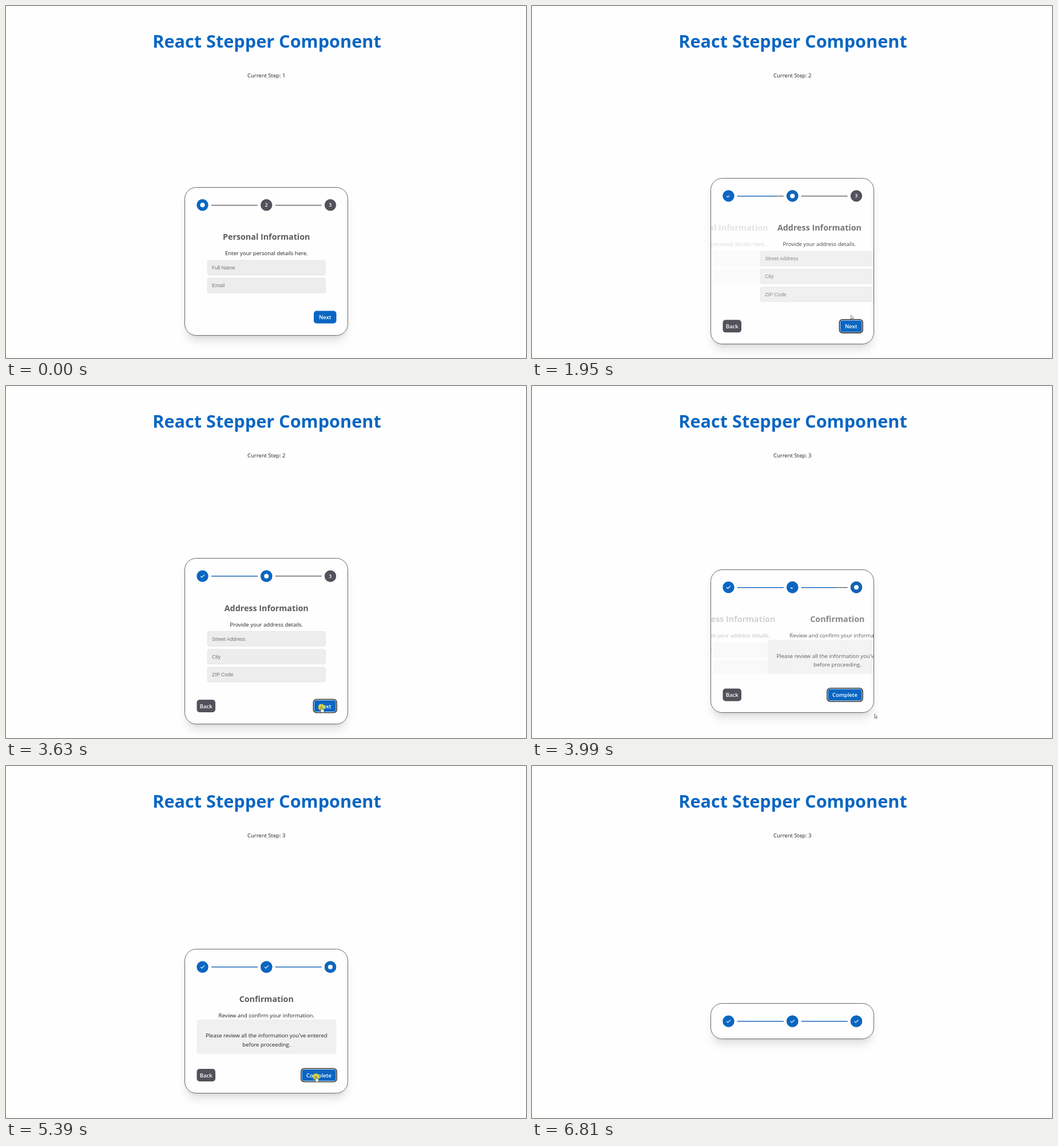
Recreate the animation shown at these times as an HTML page. Size 909x616 px, loop 7400 ms.

```html
<!DOCTYPE html>
<html lang="en">
<head>
<meta charset="utf-8">
<title>React Stepper Component</title>
<style>
html, body { margin: 0; width: 100%; height: 100%; overflow: hidden; background: #fefefe; }
svg { display: block; position: absolute; left: 0; top: 0; }
text { font: 9.52px "Open Sans", "Noto Sans", sans-serif; text-anchor: middle; fill: #222; }
.title { font-size: 30.65px; font-weight: 700; fill: #0a66c2; }
.head { font-size: 14.3px; font-weight: 700; fill: #5c5c5c; }
.hint { font: 8.9px "Liberation Sans", Arial, sans-serif; text-anchor: start; fill: #757575; }
.btn { font-size: 9.45px; font-weight: 600; fill: #fff; }
.num { font-size: 8.4px; font-weight: 600; fill: #fff; }
#card { position: absolute; left: 312px; width: 286px; box-sizing: border-box; border-radius: 20.5px;
  box-shadow: 0 13px 16px -3px rgba(0,0,0,.1), 0 5px 6px -4px rgba(0,0,0,.1); }
</style>
</head>
<body>
<div id="card"></div>
<svg id="stage" width="909" height="616" viewBox="0 0 909 616"></svg>
<script>
const LOOP = 7400, BLUE = '#0a66c2', GRAY = '#52525b';
const MID_X = 455.25, MID_Y = 446.75, HEADER = 61.5, FOOTER = 68, SLIDE_W = 285;
const starts = [1720, 3801, 5560];          // when each step transition begins
const shown = [1750, 3801, 5570];           // when it first becomes visible
const heights = [129, 160, 122, 0];         // content height per stage
const clicks = [[1570, 1690], [3630, 3780], [5390, 5540]];
const dots = [343.5, 455.25, 567];
const stage = document.getElementById('stage'), card = document.getElementById('card');

// time, x, y of the pointer
const pointer = [
  [260, 726, 301], [400, 690, 370], [600, 613, 490], [780, 559, 555], [920, 557, 562],
  [1010, 558, 560], [1400, 557.5, 541], [1950, 557.5, 541], [2250, 588, 547], [2550, 599, 544],
  [2630, 595, 545], [3020, 551.5, 560], [3160, 551.5, 561.5], [3850, 551.5, 561.5],
  [3990, 598.5, 574], [4200, 671, 562], [4370, 630, 541], [4440, 621, 540],
  [4840, 542, 543], [5620, 542, 543], [5850, 590, 560], [6080, 621.5, 564],
  [6170, 634, 567], [6500, 748, 584], [6810, 858, 603]
];

const clamp = v => Math.min(1, Math.max(0, v));

function ease(x) {                          // cubic-bezier(.25, .1, .35, 1)
  x = clamp(x);
  const curve = (s, a, b) => 3 * (1 - s) ** 2 * s * a + 3 * (1 - s) * s * s * b + s ** 3;
  let lo = 0, hi = 1;
  for (let i = 0; i < 20; i++) {
    const s = (lo + hi) / 2;
    if (curve(s, .25, .35) < x) lo = s; else hi = s;
  }
  return curve(lo, .1, 1);
}

function spring(ms) {
  const zeta = .75, w = 23.4, root = Math.sqrt(1 - zeta * zeta), t = Math.max(0, ms) / 1000;
  return 1 - Math.exp(-zeta * w * t) * (Math.cos(w * root * t) + zeta / root * Math.sin(w * root * t));
}

const text = (x, y, str, cls = '') => `<text x="${x}" y="${y}" class="${cls}">${str}</text>`;
const rect = (x, y, w, h, r, fill, extra = '') =>
  `<rect x="${x}" y="${y}" width="${w}" height="${h}" rx="${r}" fill="${fill}" ${extra}/>`;
const circle = (x, y, r, fill, alpha = 1) =>
  `<circle cx="${x}" cy="${y}" r="${r}" fill="${fill}" opacity="${alpha}"/>`;

const heading = (title, line) => text(MID_X, 30, title, 'head') + text(MID_X, 57, line);
const fields = names => names.map((name, i) => {
  const y = 66 + i * 31.3;
  return rect(352.2, y, 206.2, 25.8, 3, '#ededed', 'stroke="#e0e0e0" stroke-width=".7"')
    + text(360, y + 16, name, 'hint');
}).join('');

const slides = [
  heading('Personal Information', 'Enter your personal details here.') + fields(['Full Name', 'Email']),
  heading('Address Information', 'Provide your address details.') + fields(['Street Address', 'City', 'ZIP Code']),
  heading('Confirmation', 'Review and confirm your information.')
    + rect(333.5, 61, 244, 60.5, 2.5, '#f0f0f0')
    + text(MID_X, 92.5, "Please review all the information you've entered")
    + text(MID_X, 108, 'before proceeding.'),
  ''
];

const slide = (i, dx, alpha) => `<g transform="translate(${dx})" opacity="${alpha}">${slides[i]}</g>`;

function indicators(t, step, y) {
  const row = Math.floor(y);
  let out = '';
  for (let i = 0; i < 2; i++) {
    const x = dots[i] + 15.5, fill = step > i ? ease((t - starts[i]) / 400) : 0;
    out += rect(x, row, 81, 1.2, .5, GRAY) + rect(x, row, 81 * fill, 1.2, .5, BLUE);
  }
  dots.forEach((x, i) => {
    const tint = i === 0 ? 1 : step >= i ? ease((t - starts[i - 1]) / 300) : 0;
    out += tint < 1 ? circle(x, y, 10.2, GRAY) : '';
    out += circle(x, y, 10.2, BLUE, tint);
    if (i > step) out += text(x, y + 3, i + 1, 'num');
    else if (i === step) out += circle(x, y, 4, '#fff');
    else {
      const p = 1 - (1 - clamp((t - starts[i] - 100) / 300)) ** 2;
      if (p > 0) out += `<path d="M${x - 3} ${y + .4}l1.8 1.8 4.4-4.4" pathLength="1" stroke-dasharray="${p} 2"
        fill="none" stroke="#fff" stroke-width="1.2" stroke-linecap="round" stroke-linejoin="round"/>`;
    }
  });
  return out;
}

function button(x, y, w, label, fill, focused) {
  const ring = focused
    ? rect(x - 1.3, y - 1.3, w + 2.6, 24.6, 6, '#101010') + rect(x, y, w, 22, 5, '#fff')
      + rect(x + .9, y + .9, w - 1.8, 20.2, 4, fill)
    : rect(x, y, w, 22, 5, fill);
  return ring + text(x + w / 2, y + 14.7, label, 'btn');
}

function cursor(t, btn) {
  const next = pointer.findIndex(p => p[0] > t);
  if (next < 1) return '';
  const [t0, x0, y0] = pointer[next - 1], [t1, x1, y1] = pointer[next];
  const k = (t - t0) / (t1 - t0), x = x0 + (x1 - x0) * k, y = y0 + (y1 - y0) * k;
  const over = btn && x > btn.x && x < btn.x + btn.w && y > btn.y && y < btn.y + 22;
  const shape = over
    ? 'M-.9 .8a.9 .9 0 0 1 1.8 0V4.2l3 .8q.9.3.7 1.4L4 10H.2L-2 6.9q.1-1.1 1.1-.4z'
    : 'M0 0V7.3L1.7 5.8 2.8 8.3 3.9 7.8 2.8 5.4H5z';
  const pressed = clicks.some(([a, b]) => t >= a && t < b);
  return (pressed ? circle(x, y + .8, 6, '#f0e010', .75) : '')
    + `<path transform="translate(${x} ${y})" d="${shape}" fill="#fff" stroke="#222" stroke-width=".6"/>`;
}

function draw(t) {
  const step = shown.filter(s => t >= s).length;
  const since = step ? t - starts[step - 1] : 0;
  const from = heights[Math.max(0, step - 1)];
  const body = step ? Math.max(0, from + (heights[step] - from) * spring(since)) : heights[0];
  const height = HEADER + body + (step < 3 ? FOOTER : 0);
  const top = MID_Y - height / 2, bottom = top + height;
  const edge = Math.floor(top), frame = Math.floor(bottom) - edge;   // border sits on whole pixels

  card.style.top = edge + 'px';
  card.style.height = frame + 1 + 'px';

  const p = step ? ease(since / 400) : 1;
  let content = slide(step, SLIDE_W * (1 - p), p);
  if (p < 1) content = slide(step - 1, -SLIDE_W / 2 * p, 1 - p) + content;

  let footer = '', btn = null;
  if (step < 3) {
    const w = step === 2 ? 61 : 39.5;
    btn = { x: 577.5 - w, y: bottom - 42.5, w };
    footer = button(btn.x, btn.y, w, step === 2 ? 'Complete' : 'Next', BLUE, t >= clicks[0][0]);
    if (step) footer += button(333.5, btn.y, 32.5, 'Back', GRAY);
  }

  stage.innerHTML = `<clipPath id="clip"><rect x="313" y="0" width="284" height="${body}"/></clipPath>`
    + text(456, 73, 'React Stepper Component', 'title')
    + text(MID_X, 124.5, 'Current Step: ' + Math.min(3, step + 1))
    + rect(312.5, edge + .5, 285, frame, 20, '#fefefe', 'stroke="#66666b"')
    + indicators(t, step, top + 30.75)
    + `<g transform="translate(0 ${top + HEADER})"><g clip-path="url(#clip)">${content}</g></g>`
    + footer + cursor(t, btn);
}

const begin = performance.now();
function tick() {
  draw((performance.now() - begin) % LOOP);
  requestAnimationFrame(tick);
}
tick();
</script>
</body>
</html>
```
